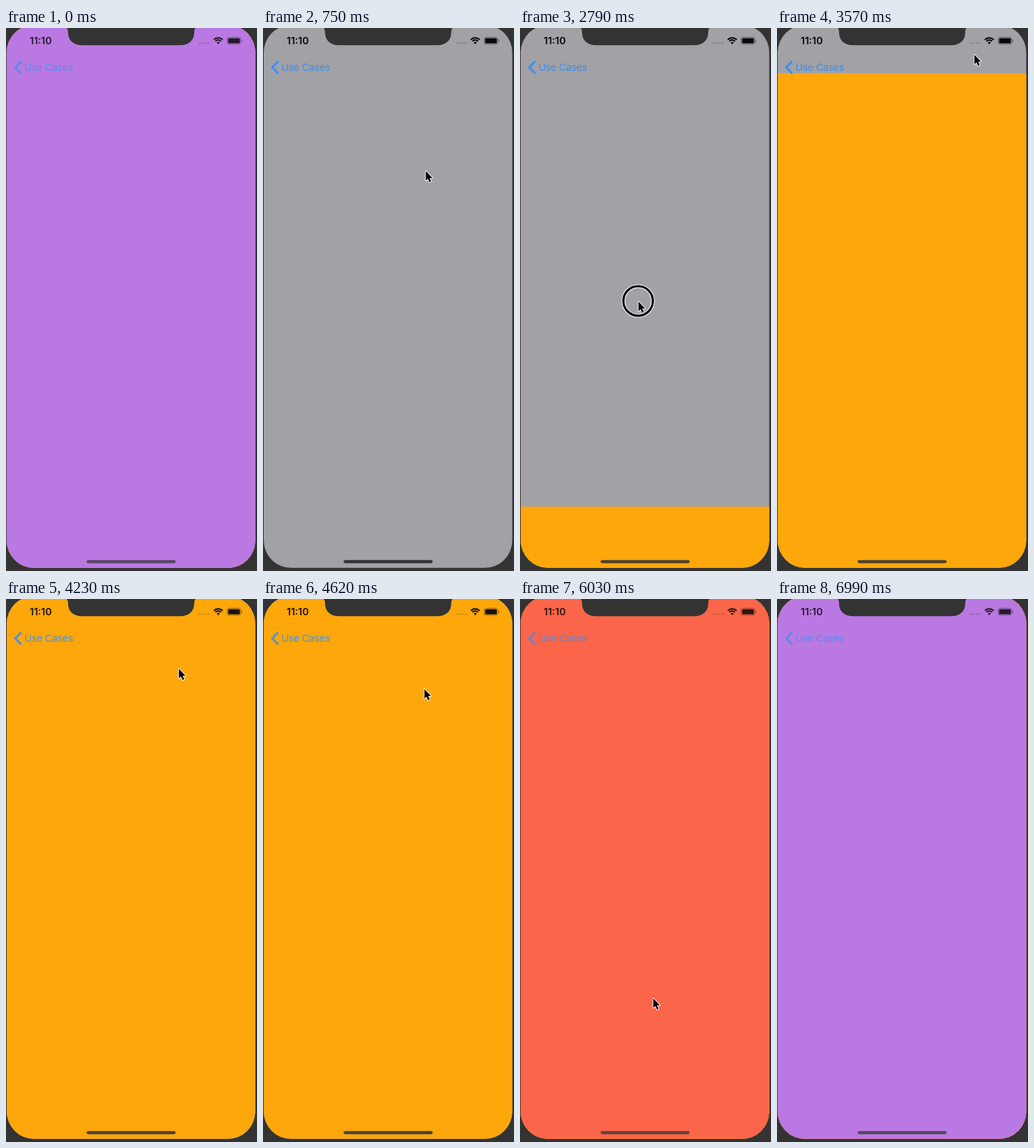
Animation, 340 px wide and 734 px high, one loop 7710 ms. Source, as an HTML page with a canvas:

```html
<!DOCTYPE html>
<html lang="en">
<head>
<meta charset="utf-8">
<title>Sheet gestures</title>
<style>
  html, body { margin: 0; width: 100%; height: 100%; overflow: hidden; background: #333; }
  canvas { display: block; width: 340px; height: 734px; }
</style>
</head>
<body>
<canvas id="stage"></canvas>
<script>
const W = 340, H = 734, LOOP = 7710, RESET = 30, SETTLE = 0.01528;
const BEZEL = '#333333', INK = '#08080a', LINK = '#3b8fee';
const canvas = document.getElementById('stage');
const ctx = canvas.getContext('2d');
const scale = window.devicePixelRatio || 1;
canvas.width = W * scale;
canvas.height = H * scale;

const clamp = v => Math.max(0, Math.min(1, v));
const smooth = v => v * v * (3 - 2 * v);
const lerp = (a, b, k) => a + (b - a) * k;
const channels = hex => [1, 3, 5].map(i => parseInt(hex.slice(i, i + 2), 16));

function mix(a, b, k) {
  const to = channels(b);
  return `rgb(${channels(a).map((v, i) => Math.round(lerp(v, to[i], k)))})`;
}

// Labels take on part of the colour behind them.
const theme = (bg, tint) => ({
  bg,
  ink: mix(INK, bg, tint * 0.6),
  link: mix(LINK, bg, tint),
  bar: mix(BEZEL, bg, tint),
  edge: mix(BEZEL, bg, tint),
  dots: mix(bg, BEZEL, 0.24)
});
const themes = {
  grey: theme('#a2a1a6', 0),
  orange: theme('#fda70a', 0.12),
  red: theme('#fb6549', 0.26),
  purple: theme('#ba79e2', 0.27)
};

// Pointer moves; those with a sheet press the screen until release.
const strokes = [
  { start: 480, stop: 1150, from: [262, -24], to: [145, 580] },
  { start: 1200, stop: 1560, release: 1660, from: [145, 580], to: [149, 447], sheet: 'orange', rest: 0 },
  { start: 2390, stop: 2790, release: 2890, from: [154, 456], to: [160, 369], sheet: 'orange', rest: 0 },
  { start: 3230, stop: 3540, release: 3450, from: [165, 470], to: [267, 35], sheet: 'orange', rest: H },
  { start: 4650, stop: 5500, release: 5500, from: [218, 121], to: [180, 539], sheet: 'red', rest: H },
  { start: 6585, stop: 6990, from: [180, 539], to: [-14, 684] }
];

function pointer(t) {
  const i = strokes.findLastIndex(s => s.start <= t);
  if (i < 0) return null;
  const now = strokes[i], next = strokes[i + 1];
  const moving = t < now.stop;
  if (!moving && !next) return null;
  const a = moving ? now.from : now.to;
  const b = moving ? now.to : next.from;
  const k = moving
    ? (t - now.start) / (now.stop - now.start)
    : (t - now.stop) / (next.start - now.stop);
  return a.map((v, n) => lerp(v, b[n], smooth(k)));
}

// A sheet follows the finger, then settles towards its rest height.
function sheetHeight(t, name) {
  const s = strokes.findLast(s => s.sheet === name && s.start <= t);
  if (!s) return 0;
  const held = Math.abs(pointer(Math.min(t, s.release))[1] - s.from[1]);
  if (t <= s.release) return held;
  const h = lerp(s.rest, held, Math.exp(-SETTLE * (t - s.release)));
  return Math.abs(h - s.rest) < 1 ? s.rest : h;
}

function heights(t) {
  if (t < RESET) return { orange: H, red: H, purple: H };
  return {
    orange: sheetHeight(t, 'orange'),
    red: sheetHeight(t, 'red'),
    purple: H * smooth(clamp((t - 6040) / 290))
  };
}

function fillRound(x, y, w, h, r, color) {
  ctx.beginPath();
  ctx.roundRect(x, y, w, h, r);
  ctx.fillStyle = color;
  ctx.fill();
}

function drawText(text, x, y, font, color, spacing = 0) {
  ctx.font = `${font} Inter, sans-serif`;
  ctx.letterSpacing = `${spacing}px`;
  ctx.fillStyle = color;
  ctx.fillText(text, x, y);
}

function drawNotch() {
  ctx.beginPath();
  ctx.moveTo(79, -1);
  ctx.quadraticCurveTo(84, -1, 84, 5);
  ctx.bezierCurveTo(84, 17, 91, 23.2, 103, 23.2);
  ctx.lineTo(236, 23.2);
  ctx.bezierCurveTo(248, 23.2, 255, 17, 255, 5);
  ctx.quadraticCurveTo(255, -1, 260, -1);
  ctx.fillStyle = BEZEL;
  ctx.fill();
}

function drawStatus({ ink, dots }) {
  drawText('11:10', 32, 22, '600 13.4px', ink);
  for (let i = 0; i < 4; i++) fillRound(261.2 + i * 4, 19.2, 2.6, 2.6, 1.3, dots);

  const wave = r => ctx.arc(287.5, 21.6, r, -Math.PI * 0.76, -Math.PI * 0.24);
  ctx.strokeStyle = ctx.fillStyle = ink;
  ctx.lineWidth = 1.9;
  for (const r of [5.3, 8.3]) {
    ctx.beginPath();
    wave(r);
    ctx.stroke();
  }
  ctx.beginPath();
  ctx.moveTo(287.5, 22);
  wave(2.8);
  ctx.fill();

  ctx.globalAlpha = 0.4;
  ctx.lineWidth = 1;
  ctx.beginPath();
  ctx.roundRect(299.5, 12.5, 18.5, 9.5, 2.8);
  ctx.stroke();
  fillRound(318.9, 15.5, 1.2, 3.4, 0.6, ink);
  ctx.globalAlpha = 1;
  fillRound(300.8, 13.8, 16, 7, 1.5, ink);
}

function drawNav({ link }) {
  ctx.strokeStyle = link;
  ctx.lineWidth = 2.8;
  ctx.beginPath();
  ctx.moveTo(20.6, 45);
  ctx.lineTo(12.6, 53.2);
  ctx.lineTo(20.6, 61.4);
  ctx.stroke();
  drawText('Use Cases', 25, 58, '400 13.5px', link, -0.3);
}

function drawPointer([x, y], pressed) {
  if (pressed) {
    ctx.beginPath();
    ctx.arc(x, y, 20, 0, Math.PI * 2);
    ctx.strokeStyle = '#fff';
    ctx.lineWidth = 5;
    ctx.stroke();
    ctx.strokeStyle = '#000';
    ctx.lineWidth = 3;
    ctx.stroke();
  }
  ctx.save();
  ctx.translate(x + 0.5, y + 0.8);
  ctx.scale(0.88, 0.92);
  const arrow = new Path2D('M0 0V14.2L3.2 11.3L5.6 16.6L8.2 15.4L5.9 10.4L10.2 10.2Z');
  ctx.lineJoin = 'round';
  ctx.strokeStyle = '#fff';
  ctx.lineWidth = 2;
  ctx.stroke(arrow);
  ctx.fillStyle = '#000';
  ctx.fill(arrow);
  ctx.restore();
}

function draw(t) {
  const h = heights(t);
  const sheets = Object.keys(h);
  const top = themes[sheets.findLast(n => h[n] > (n === 'orange' ? H - 45 : 60)) || 'grey'];
  const bottom = themes[sheets.findLast(n => h[n] > (n === 'orange' ? 12 : H - 12)) || 'grey'];

  ctx.setTransform(scale, 0, 0, scale, 0, 0);
  ctx.fillStyle = BEZEL;
  ctx.fillRect(0, 0, W, H);
  ctx.fillStyle = bottom.edge;
  ctx.fillRect(0, 30, 1, 668);

  ctx.save();
  ctx.beginPath();
  ctx.roundRect(1, -4, 336.6, 733.8, 37);
  ctx.clip();
  ctx.fillStyle = themes.grey.bg;
  ctx.fillRect(0, 0, W, H);
  for (const name of sheets) {
    ctx.fillStyle = themes[name].bg;
    ctx.fillRect(0, name === 'orange' ? H - h[name] : 0, W, h[name]);
  }
  ctx.restore();

  drawNotch();
  drawStatus(top);
  drawNav(top);
  fillRound(109.2, 719.2, 120.6, 4.2, 2.1, bottom.bar);

  const p = pointer(t);
  if (p) drawPointer(p, strokes.some(s => s.sheet && t >= s.start && t < s.release));
}

function tick() {
  draw(performance.now() % LOOP);
  requestAnimationFrame(tick);
}
tick();
</script>
</body>
</html>
```
